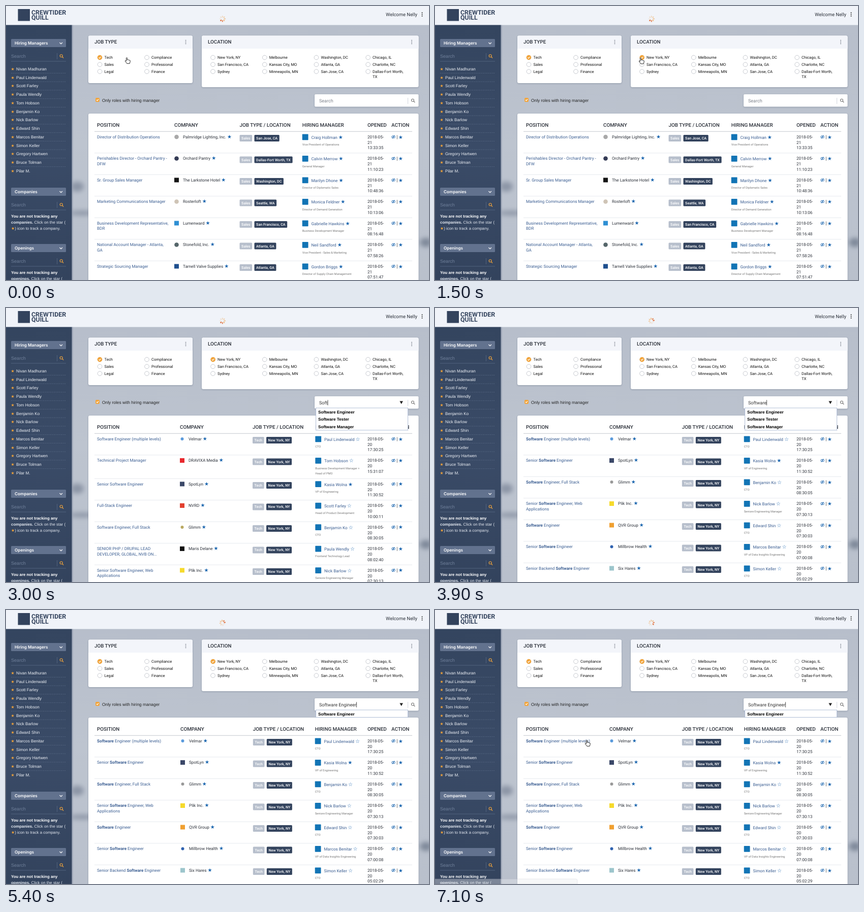
An HTML page that plays this animation: 832 px wide and 540 px high, repeating every 7200 ms.

```html
<!DOCTYPE html>
<html lang="en">
<head>
<meta charset="utf-8">
<title>Recruiting dashboard</title>
<style>
  html, body { margin: 0; width: 100%; height: 100%; overflow: hidden; }
  svg { display: block; width: 832px; height: 540px; font-family: Roboto, sans-serif; text-rendering: geometricPrecision; white-space: pre; }
  .arial { font-family: "Liberation Sans", Arial, sans-serif; }
  .star { font-family: "DejaVu Sans", sans-serif; font-size: 10px; fill: #1763ad; font-weight: 400; }
  .card { filter: drop-shadow(0 1px 1.5px rgba(40, 55, 80, .3)); }
</style>
</head>
<body>
<svg id="stage" viewBox="0 0 832 540"></svg>
<script>
const LOOP = 7200;
const NAVY = '#33435d', LINK = '#3b5e92', BLUE = '#1763ad', INK = '#2b3039', ORANGE = '#f2a43a';
const pen = document.createElement('canvas').getContext('2d');

// Text is placed by the vertical middle of its capitals.
const text = (x, mid, str, size = 8.17, fill = INK, attrs = '') =>
  `<text x="${x}" y="${mid + size * .355}" font-size="${size}" fill="${fill}" ${attrs}>${str}</text>`;
const arial = (x, mid, str, size, fill, attrs = '') => text(x, mid, str, size, fill, 'class="arial" ' + attrs);
const rect = (x, y, w, h, fill, attrs = '') =>
  `<rect x="${x}" y="${y}" width="${w}" height="${h}" fill="${fill}" ${attrs}/>`;
const circle = (x, y, r, fill, attrs = '') => `<circle cx="${x}" cy="${y}" r="${r}" fill="${fill}" ${attrs}/>`;
const path = (d, stroke, width = 1, attrs = '') =>
  `<path d="${d}" fill="none" stroke="${stroke}" stroke-width="${width}" ${attrs}/>`;
const star = full => `<tspan class="star" dx="2">${full ? '★' : '☆'}</tspan>`;
const kebab = (x, y, fill) => [-3.2, 0, 3.2].map(d => circle(x, y + d, 1.05, fill)).join('');
const magnifier = (x, y, color) =>
  circle(x - .8, y - .8, 2.5, 'none', `stroke="${color}" stroke-width="1.1"`) +
  path(`M${x + 1} ${y + 1}l2.6 2.6`, color, 1.3);

function background() {
  return `<defs>
    <linearGradient id="sky" x2="0" y2="1"><stop stop-color="#b6bdca"/><stop offset=".5" stop-color="#bdc4cf"/><stop offset="1" stop-color="#b9c0cc"/></linearGradient>
    <linearGradient id="side" x2="0" y2="1"><stop stop-color="#34455f"/><stop offset=".5" stop-color="#3a4b67"/><stop offset="1" stop-color="#33435d"/></linearGradient>
    <filter id="soft" x="-1" y="-1" width="3" height="3"><feGaussianBlur stdDeviation="5"/></filter></defs>` +
    rect(0, 0, 832, 540, 'url(#sky)') +
    `<g filter="url(#soft)" fill="#8c95a6"><ellipse cx="140" cy="356" rx="13" ry="10"/>
      <ellipse cx="150" cy="408" rx="26" ry="5" fill="#8f98a8"/>
      <ellipse cx="826" cy="466" rx="12" ry="9" fill="#7e8899"/></g>` +
    rect(0, 0, 832, 37.5, '#f0f3f9') + rect(129, 37.5, 3, 503, '#8d98ab', 'opacity=".5"') +
    rect(0, 37.5, 129.5, 503, 'url(#side)');
}

function topBar() {
  const bold = 'font-weight="700"';
  return rect(23.5, 6, 23.5, 23.5, NAVY) +
    text(50, 12.5, 'CREWTIDER', 12.4, NAVY, bold) + text(50, 23, 'QUILL', 12.4, NAVY, bold) +
    text(747, 16.5, 'Welcome Nelly', 9.4) + kebab(818.5, 16.5, '#333');
}

function sideSection(y, title) {
  return rect(10, y, 108, 16, '#62728e', 'rx="1.5"') +
    text(17, y + 8, title, 8.2, '#fff', 'style="font-family:Inter,sans-serif" font-weight="600"') +
    path(`M105.5 ${y + 7}l2.7 2.7 2.7-2.7`, '#fff', 1.2) +
    arial(10, y + 34, 'Search', 9.1, '#70809b') + magnifier(109.5, y + 34, ORANGE) +
    path(`M10 ${y + 44}h108M100.5 ${y + 28}v12`, '#586a86', .8);
}

function emptyNote(y, thing, single) {
  const bold = 'font-weight="700"';
  return arial(10, y, 'You are not tracking any', 7.9, '#fff', bold) +
    arial(10, y + 12, `<tspan ${bold}>${thing}.</tspan> Click on the star (`, 7.9, '#e3e8f0') +
    arial(10, y + 24, `<tspan class="star" style="fill:${ORANGE};font-size:8px">★</tspan>) icon to track a ${single}.`, 7.9, '#e3e8f0');
}

function sidebar() {
  const people = ['Nivan Madhuran', 'Paul Lindenwald', 'Scott Farley', 'Paula Wendly', 'Tom Hobson', 'Benjamin Ko',
    'Nick Barlow', 'Edward Shin', 'Marcos Benitar', 'Simon Keller', 'Gregory Hartwen', 'Bruce Tolman', 'Pilar M.'];
  return sideSection(65, 'Hiring Managers') + people.map((name, i) => {
    const y = 124 + i * 16.75;
    return text(9.5, y, '★', 8, ORANGE, 'style="font-family:\'DejaVu Sans\',sans-serif"') +
      arial(20, y, name, 8.17, '#eef1f6') +
      (i < 12 ? path(`M10 ${y + 8.4}h108`, '#5f708b', .7, 'stroke-dasharray="2 1.5"') : '');
  }).join('') +
    sideSection(358, 'Companies') + emptyNote(414.5, 'companies', 'company') +
    sideSection(469, 'Openings') + emptyNote(525, 'openings', 'role');
}

const tick = (x, y) => path(`M${x - 2} ${y}l1.5 1.6 2.7-3`, '#fff', 1.1);
const checked = (x, y) => circle(x, y, 4.7, ORANGE) + tick(x, y);

function panel(x, w, h, title, columns, left, pitch) {
  return `<g class="card">${rect(x, 58.5, w, h, '#fff', 'rx="3"')}</g>` +
    path(`M${x} 84V61.5q0-3 3-3h${w - 6}q3 0 3 3V84z`, 'none', 0, 'style="fill:#f3f5fa"') +
    text(x + 12, 71, title, 9.8, INK, 'font-weight="500"') + kebab(x + w - 13.5, 71, '#8a8f99') +
    columns.map((labels, c) => labels.map((label, i) => {
      const cx = left + c * pitch, cy = 101.5 + i * 13.8;
      return circle(cx, cy, 4.3, '#fff', 'stroke="#b9bdc4" stroke-width=".8"') +
        label.split('|').map((s, n) => text(cx + 9, cy + n * 10.4, s, 7.6, '#111')).join('');
    }).join('')).join('');
}

function filters() {
  return panel(162, 205, 93.5, 'JOB TYPE', [['Tech', 'Sales', 'Legal'], ['Compliance', 'Professional', 'Finance']], 184.5, 92.5) +
    panel(385, 426.5, 101.5, 'LOCATION', [['New York, NY', 'San Francisco, CA', 'Sydney'],
      ['Melbourne', 'Kansas City, MO', 'Minneapolis, MN'], ['Washington, DC', 'Atlanta, GA', 'San Jose, CA'],
      ['Chicago, IL', 'Charlotte, NC', 'Dallas-Fort Worth,|TX']], 407, 101.7) +
    checked(184.5, 101.5) + `<g id="cityOn">${checked(407.2, 101.5)}</g>` +
    rect(176, 181, 8, 8, ORANGE, 'rx="2"') + tick(180, 185) +
    arial(189, 186.5, 'Only roles with hiring manager', 8.4, '#222') +
    `<g class="card">${rect(607, 174, 204.5, 24.5, '#fff', 'rx="2"')}</g>` +
    path('M790.5 181v12', '#ccd0d8', .9) + magnifier(800.7, 186.5, '#777') +
    `<g class="card">${rect(162, 212, 649.5, 340, '#fff', 'rx="3"')}</g>`;
}

// title / company / icon / location / manager (* = followed) / role / time, "|" breaks a line
const sales = `Director of Distribution Operations/Palmridge Lighting, Inc./o#a9a9a9/San Jose, CA/Craig Hollman*/Vice President of Operations/13:33:35
Perishables Director - Orchard Pantry -|DFW/Orchard Pantry/o#343b55/Dallas-Fort Worth, TX/Calvin Merrow*/General Manager/11:10:23
Sr. Group Sales Manager/The Larkstone Hotel/s#151515/Washington, DC/Marilyn Dhone*/Director of Diplomatic Sales/10:48:36
Marketing Communications Manager/Rosterloft/o#cfc4b6/Seattle, WA/Monica Feldner*/Director of Demand Generation/10:13:06
Business Development Representative,|BDR/Lumenward/s#2f8fd3/San Francisco, CA/Gabrielle Hawkins*/Business Development Manager/08:16:48
National Account Manager - Atlanta,|GA/Stonefold, Inc./o#55666a/Atlanta, GA/Neil Sandford*/Vice President - Sales &amp; Marketing/07:58:26
Strategic Sourcing Manager/Tarnell Valve Supplies/s#1e4f8e/Atlanta, GA/Gordon Briggs*/Director of Supply Chain Management/07:51:47`;
const tech = `Software Engineer (multiple levels)/Velmar/d#5b9bdc/New York, NY/Paul Lindenwald/CTO/17:30:25
Technical Project Manager/DRAVIXA Media/s#e8282d/New York, NY/Tom Hobson/Business Development Manager +|Head of PMO/15:31:07
Senior Software Engineer/SpotLyn/s#3b4868/New York, NY/Kasia Wolna*/VP of Engineering/11:30:52
Full-Stack Engineer/NVRD/s#e2402f/New York, NY/Scott Farley/Head of Product Development/10:00:11
Software Engineer, Full Stack/Glimm/d#b9a860/New York, NY/Benjamin Ko/CTO/08:30:05
SENIOR PHP / DRUPAL LEAD|DEVELOPER, GLOBAL, NVB ON.../Maris Delane/s#111/New York, NY/Paula Wendly/Frontend Technology Lead/08:02:40
Senior Software Engineer, Web|Applications/Plik Inc./s#f6da2c/New York, NY/Nick Barlow/Seniore Engineering Manager/07:30:13`
  .replace('PHP / DRUPAL', 'PHP &#47; DRUPAL');
const found = `Software Engineer (multiple levels)/Velmar/d#5b9bdc/New York, NY/Paul Lindenwald/CTO/17:30:25
Senior Software Engineer/SpotLyn/s#3b4868/New York, NY/Kasia Wolna*/VP of Engineering/11:30:52
Software Engineer, Full Stack/Glimm/d#999/New York, NY/Benjamin Ko/CTO/08:30:05
Senior Software Engineer, Web|Applications/Plik Inc./s#f6da2c/New York, NY/Nick Barlow/Seniore Engineering Manager/07:30:13
Software Engineer/QVR Group/s#f0a030/New York, NY/Edward Shin/CTO/07:30:03
Senior Software Engineer/Millbrow Health/d#2f62b0/New York, NY/Marcos Benitar/VP of Data Insights Engineering/07:00:08
Senior Backend Software Engineer/Six Hares/s#9cc5cc/New York, NY/Simon Keller/CTO/05:02:29`;

const lines = (x, y, str, step, ...style) =>
  str.split('|').map((s, i) => text(x, y + i * step, s, ...style)).join('');

function tag(x, y, label, fill) {
  pen.font = '500 7.1px Roboto, sans-serif';
  return rect(x, y - 6.5, pen.measureText(label).width + 7.2, 13, fill, 'rx="1.5"') +
    text(x + 3.6, y, label, 7.1, '#fff', 'font-weight="500"');
}

function icon(x, y, code) {
  const fill = code.slice(1);
  if (code[0] === 's') return rect(x, y - 4.5, 9, 9, fill);
  return circle(x + 4.5, y, code[0] === 'o' ? 4.3 : 3, fill);
}

function table(id, data, kind, day, [company, type, manager], highlight) {
  const heads = [[179, 'POSITION'], [company, 'COMPANY'], [type, 'JOB TYPE / LOCATION'],
    [manager, 'HIRING MANAGER'], [711, 'OPENED'], [758, 'ACTION']];
  let out = heads.map(([x, s]) => text(x, 235, s, 9.85, INK, 'font-weight="500"')).join('') +
    path('M174 247.3h625', '#c3c7ce', 1.1);
  let y = 258;
  for (const row of data.split('\n')) {
    let [title, firm, mark, city, name, role, time] = row.includes('&#47;')
      ? row.replace('PHP / ', 'PHP &#47; ').split('/') : row.split('/');
    if (highlight) title = title.replace('Software', '<tspan font-weight="700">Software</tspan>');
    const followed = name.endsWith('*');
    out += lines(179, y, title, 10.4, 8.17, LINK) +
      icon(company, y, mark) + text(company + 17, y, firm + star(true)) +
      tag(type, y + 2.5, kind, '#b7bfcc') + tag(type + (kind === 'Sales' ? 29 : 27), y + 2.5, city, NAVY) +
      rect(manager, y - 5.6, 11.8, 11.8, '#1274b5', 'rx=".8"') +
      text(manager + 17.7, y + 1, name.replace('*', '') + star(followed), 8.17, LINK) +
      lines(manager, y + 15, role, 10.6, 5.75, '#777') +
      lines(711, y, `2018-05-|${day}|${time}`, 10.75, 8.17) +
      `<ellipse cx="762" cy="${y}" rx="3.4" ry="2.3" fill="none" stroke="${BLUE}" stroke-width=".9"/>` +
      circle(762, y, 1.1, BLUE) + path(`M759.5 ${y + 3.2}l5-6.4`, BLUE, .9) +
      path(`M769.3 ${y - 3.5}v8`, '#555', .8) + text(771.7, y, '★', 10, BLUE, 'class="star"');
    const height = role.includes('|') ? 46.4 : 42.5;
    out += path(`M174 ${y + height - 10.7}h625`, '#e4e7ec', .9);
    y += height;
  }
  return `<g id="${id}">${out}</g>`;
}

function searchBox() {
  const options = ['Engineer', 'Tester', 'Manager'].map((s, i) =>
    arial(614, 205 + i * 14.4, 'Software ' + s, 8.17, '#000', `font-weight="700" class="arial" id="option${i}"`).replace('class="arial" ', '')).join('');
  return text(616, 186.5, '', 9, '#333', 'id="query"') + rect(616, 181.3, .8, 10.5, '#222', 'id="caret"') +
    `<path id="arrow" d="M774.3 183.6h6.6l-3.3 5.6z" fill="#222"/>` +
    `<g id="menu">${rect(609.5, 197, 181, 44, '#fff', 'id="menuBox" stroke="#a9b8d3" stroke-width=".9"')}${options}</g>`;
}

function pointers() {
  return `<g id="hand"><path d="M-1 .8q1-1.5 2 0v4l1-.6 1.2.7 1-.3 1 .9 1.3.2.3 2.2-1.2 4H.3L-3.2 7q.2-1.4 1.4-.7l.8.8z" fill="#fff" stroke="#111" stroke-width=".9"/></g>
    <g id="pointer"><path d="M0 0v9l2.1-1.9 1.5 3.2 1.5-.7-1.5-3.1h2.8z" fill="#111" stroke="#fff" stroke-width=".6"/></g>
    <g id="beam">${path('M-2-4.5q2 0 2 1.5V3q0 1.5-2 1.5M2-4.5q-2 0-2 1.5V3q0 1.5 2 1.5', '#111', .9)}</g>`;
}

const stage = document.getElementById('stage');
const petals = Array.from({ length: 8 }, (_, i) =>
  `<ellipse cx="4.4" rx="1.9" ry="1.2" fill="${i > 5 ? '#e0662f' : '#efa95c'}" opacity="${.12 + i * .11}" transform="rotate(${i * 45})"/>`).join('');
stage.innerHTML = background() + topBar() + sidebar() + filters() +
  table('sales', sales, 'Sales', 21, [331, 459.5, 582.7]) +
  table('tech', tech, 'Tech', 20, [342, 485, 608.3]) +
  table('found', found, 'Tech', 20, [343, 485.8, 607.7], true) +
  searchBox() + `<g id="spinner">${petals}</g>` +
  `<path id="status" d="M0 530h277q3 0 3 3v7H0z" fill="#e9ecf0" stroke="#aab" stroke-width=".6"/>` + pointers();

const el = id => document.getElementById(id);
const show = (id, on) => el(id).setAttribute('visibility', on ? 'visible' : 'hidden');
const QUERY = 'Software Engineer';
// time, x, y of the mouse
const route = [[0, 237.5, 101.5], [1250, 404.5, 102], [1550, 404.5, 102], [2050, 645.5, 194.5],
  [5700, 645.5, 194.5], [6100, 651, 247.5], [6300, 654, 257], [6950, 298.5, 256.5], [LOOP, 298.5, 256.5]];

function mouseAt(t) {
  const i = route.findIndex(k => k[0] > t);
  const [a, b] = [route[i - 1], route[i]];
  const p = (t - a[0]) / (b[0] - a[0]), e = p * p * (3 - 2 * p);
  return [a[1] + (b[1] - a[1]) * e, a[2] + (b[2] - a[2]) * e];
}

function draw(t) {
  const typed = Math.max(0, Math.min(QUERY.length, Math.floor((t - 2200) / 185)));
  const focused = t >= 2050, typing = typed > 0 && typed < QUERY.length;

  show('cityOn', t >= 1350);
  show('sales', t < 1800);
  show('tech', t >= 1800 && t < 3900);
  show('found', t >= 3900);

  const query = el('query');
  query.textContent = typed ? QUERY.slice(0, typed) : 'Search';
  query.setAttribute('fill', typed ? '#333' : '#7d828b');
  const width = typed ? query.getSubStringLength(0, typed) : 0;
  el('caret').setAttribute('x', 616 + width);
  show('caret', focused && (typing || Math.floor(t / 500) % 2 === 0));
  show('arrow', focused);

  const count = typed > 9 ? 1 : 3;
  show('menu', typed);
  el('menuBox').setAttribute('height', count * 14.6);
  for (const i of [1, 2]) show('option' + i, typed && count === 3);

  const [x, y] = mouseAt(t);
  const visible = t < 2385 || t >= 5700;
  const inSearch = x > 607 && y > 174 && y < 198;
  const onLink = y < 150 ? x < 330 || (x > 395 && x < 480) : y > 253 && (x < 310 || (x > 625 && x < 690));
  const shape = inSearch ? 'beam' : onLink ? 'hand' : 'pointer';
  for (const id of ['hand', 'pointer', 'beam']) {
    show(id, visible && id === shape);
    el(id).setAttribute('transform', `translate(${x} ${y})`);
  }

  show('status', t > 6000 && onLink);
  el('status').setAttribute('opacity', .4);
  const step = Math.floor(t / 100) * 100;
  el('spinner').setAttribute('transform', `translate(425.8 25.3) rotate(${180 + step / 1500 * 360})`);
}

function loop() {
  draw(performance.now() % LOOP);
  requestAnimationFrame(loop);
}
loop();
</script>
</body>
</html>
```
